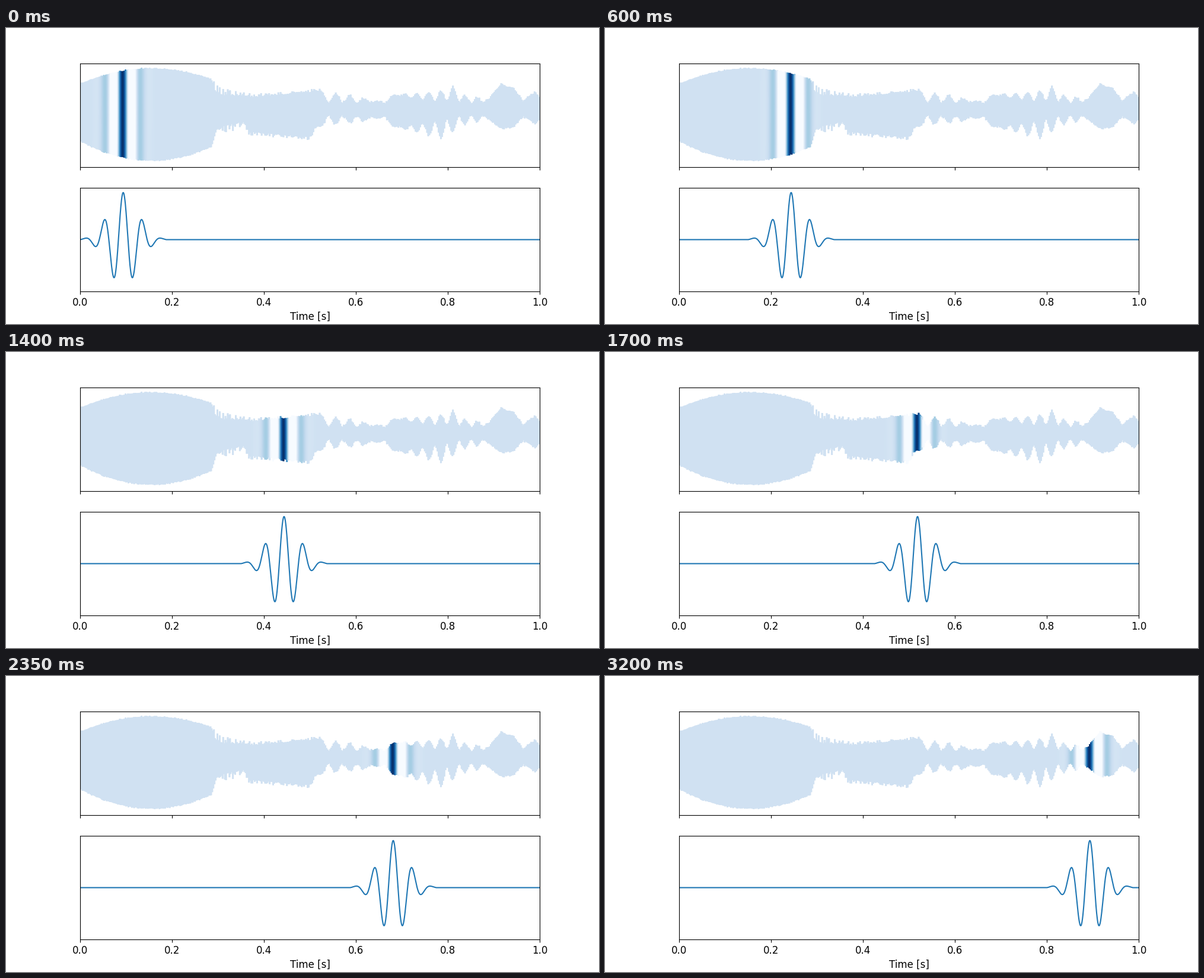
Animation of 1000 by 500 pixels, one loop 3250 ms. Source, as a matplotlib script:

```python
import numpy as np
import matplotlib.pyplot as plt
from matplotlib.animation import FuncAnimation
from matplotlib.collections import LineCollection

FRAMES, INTERVAL = 65, 50
STEP = 0.0125             # kernel shift per frame, in seconds
SUPPORT = 0.1875          # kernel length
SIGMA = SUPPORT / 6
FREQ = 4.5 / SUPPORT
LEFT, WIDTH = 125, 775    # stage pixels
AXIS = 137                # rest line of the waveform

# Loudness after the opening swell: x, height above and below the rest line
LOBES = [(358, 29, 35), (400, 25, 25), (412, 23, 41), (512, 30, 49),
         (522, 33, 31), (640, 12, 15), (652, 24, 30), (735, 31, 50),
         (754, 38, 38), (774, 23, 26), (815, 18, 18), (834, 42, 33),
         (856, 35, 31), (872, 14, 12), (892, 29, 25), (900, 18, 18)]


def wavelet(t, start, power=1):
    """Gaussian-windowed cosine; power sharpens the window."""
    d = t - start - SUPPORT / 2
    env = np.exp(-d**2 / (2 * SIGMA**2)) ** power
    return np.where(np.abs(d) <= SUPPORT / 2,
                    env * np.cos(2 * np.pi * FREQ * d), 0)


def envelope(x):
    """Heights above and below the rest line."""
    swell = 1 - 0.38 * ((x - 245) / 120) ** 2
    fade = np.interp(x, [346, 358], [1, 0])
    beat = np.interp(x, [532, 652, 815], [0, 5, 13])
    depth = 0.6 * np.abs(np.cos(np.pi * beat / 10))
    ripple = 1 - depth * np.sin(np.pi * beat) ** 2
    px, *sides = zip(*LOBES)
    return [fade * swell * peak + (1 - fade) * ripple * np.interp(x, px, side)
            for peak, side in zip((69, 87), sides)]


def waveform():
    rng = np.random.default_rng(8)
    x = np.linspace(LEFT, LEFT + WIDTH, 801)
    up, down = envelope(x)
    rough = np.where(x > 350, 3 + 13 * np.exp((350 - x) / 90), 2)
    ragged = (rng.random(x.size) ** 2 - 0.35) * rough
    swing = np.where(np.arange(x.size) % 2, -up - ragged, down + ragged)
    return (x - LEFT) / WIDTH, AXIS + swing


plt.rcParams.update({"font.family": "DejaVu Sans", "font.size": 12})
fig, (ax_wave, ax_kernel) = plt.subplots(2, 1, sharex=True,
                                         figsize=(10, 5), dpi=100)

points = np.column_stack(waveform())
mid = (points[:-1, 0] + points[1:, 0]) / 2
wave = LineCollection(np.stack([points[:-1], points[1:]], axis=1),
                      cmap="Blues", linewidths=2)
wave.set_clim(-0.25, 1)
ax_wave.add_collection(wave)
ax_wave.set(xlim=(0, 1), ylim=(235, 60), yticks=[])

t = np.linspace(0, 1, 2001)
kernel, = ax_kernel.plot(t, wavelet(t, 0), lw=1.5, color="C0")
ax_kernel.set(xlim=(0, 1), ylim=(-1.1, 1.1), yticks=[], xlabel="Time [s]")


def update(i):
    start = i * STEP
    wave.set_array(wavelet(mid, start, power=2))
    kernel.set_ydata(wavelet(t, start))
    return wave, kernel


anim = FuncAnimation(fig, update, frames=FRAMES, interval=INTERVAL,
                     init_func=lambda: update(0), repeat=True, repeat_delay=0)
plt.show()
```
